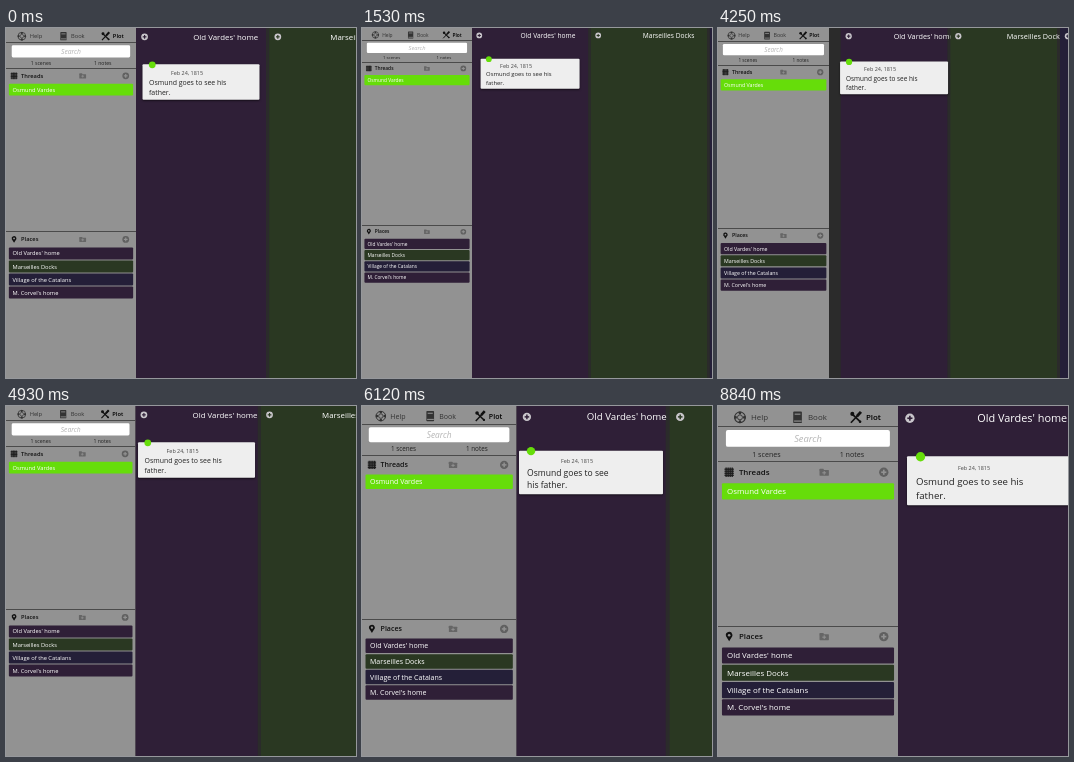
An HTML page with a canvas that plays this animation: 350 by 350 pixels, repeating every 9.01 s.

```html
<!DOCTYPE html>
<html>
<head>
<meta charset="utf-8">
<style>
html, body { margin: 0; width: 100%; height: 100%; overflow: hidden; background: #2b2b2b; }
canvas { display: block; }
</style>
</head>
<body>
<canvas id="stage" width="350" height="350"></canvas>
<script>
const ctx = document.getElementById('stage').getContext('2d');
const LOOP = 9010, STEP = 170, VIEW = 573;
const PURPLE = '#2f1f37', GREEN = '#2a3822', NAVY = '#241f38', LIME = '#66dd0a', GREY = '#929292';
const PLACES = [
  ["Old Vardes' home", PURPLE],
  ['Marseilles Docks', GREEN],
  ['Village of the Catalans', NAVY],
  ["M. Corvel's home", PURPLE]
];
// Zoom changes: [time in ms, change in percent]
const ZOOMS = [
  [500, -10], [1224, -10], [1850, -10],
  [3750, 10], [4220, 10], [4650, 10], [5080, 10],
  [5505, 10], [5990, 10], [6480, 10], [6900, 10]
];
// Zoom at time t, each change spread linearly over the given duration
const zoomAt = (t, duration) => ZOOMS.reduce((sum, [at, change]) =>
  sum + change * Math.max(0, Math.min(1, (t - at) / duration)), 130);

function rect(x, y, w, h, color, radius = 0) {
  ctx.fillStyle = color;
  ctx.beginPath();
  ctx.roundRect(x, y, w, h, radius);
  ctx.fill();
}

function disc(x, y, r, color) {
  ctx.fillStyle = color;
  ctx.beginPath();
  ctx.arc(x, y, r, 0, 7);
  ctx.fill();
}

function line(color, width, ...points) {
  ctx.strokeStyle = color;
  ctx.lineWidth = width;
  ctx.beginPath();
  points.forEach(([x, y]) => ctx.lineTo(x, y));
  ctx.stroke();
}

function text(str, x, y, size, color, align = 'left', style = '') {
  ctx.font = `${style} ${size}px "Open Sans", sans-serif`;
  ctx.textAlign = align;
  ctx.fillStyle = color;
  ctx.fillText(str, x, y + size * 0.36);
}

// Draws in a box from -1 to 1 around x, y
function icon(x, y, r, draw) {
  ctx.save();
  ctx.translate(x, y);
  ctx.scale(r, r);
  draw();
  ctx.restore();
}

function plus(x, y, r, color, cross) {
  icon(x, y, r, () => {
    disc(0, 0, 1, color);
    line(cross, 0.35, [-0.55, 0], [0.55, 0]);
    line(cross, 0.35, [0, -0.55], [0, 0.55]);
  });
}

function lifebuoy() {
  ctx.strokeStyle = '#333';
  for (const [r, width] of [[0.9, 0.18], [0.42, 0.15]]) {
    ctx.lineWidth = width;
    ctx.beginPath();
    ctx.arc(0, 0, r, 0, 7);
    ctx.stroke();
  }
  for (let i = 0; i < 4; i++) {
    ctx.lineWidth = 0.45;
    ctx.beginPath();
    ctx.arc(0, 0, 0.75, i * Math.PI / 2 - 0.3, i * Math.PI / 2 + 0.3);
    ctx.stroke();
  }
}

function book() {
  rect(-0.75, -1, 1.5, 2, '#333', 0.15);
  rect(-0.5, -0.65, 1, 0.2, GREY);
  rect(-0.6, 0.55, 1.3, 0.2, GREY);
}

function tools() {
  line('#111', 0.28, [-0.9, 0.95], [0.8, -0.85]);
  line('#111', 0.5, [0.15, -0.2], [0.85, -0.95]);
  line('#111', 0.3, [-0.8, -0.7], [0.8, 0.85]);
  disc(-0.65, -0.6, 0.35, '#111');
  disc(0.7, 0.75, 0.22, '#111');
}

function mesh() {
  for (const p of [-0.65, -0.22, 0.22, 0.65]) {
    line('#1c1c1c', 0.28, [p, -1], [p, 1]);
    line('#1c1c1c', 0.28, [-1, p], [1, p]);
  }
}

function pin() {
  ctx.fillStyle = '#111';
  ctx.beginPath();
  ctx.arc(0, -0.3, 0.7, Math.PI * 0.9, Math.PI * 2.1);
  ctx.lineTo(0, 1);
  ctx.fill();
  disc(0, -0.3, 0.28, GREY);
}

function folder() {
  rect(-1, -0.75, 0.9, 0.5, '#666', 0.1);
  rect(-1, -0.5, 2, 1.25, '#666', 0.1);
  line(GREY, 0.22, [-0.4, 0.12], [0.4, 0.12]);
  line(GREY, 0.22, [0, -0.28], [0, 0.52]);
}

function column(x, width, zoom, [title, color]) {
  rect(x, 0, width, 350, color);
  plus(x + 0.066 * zoom, 0.068 * zoom, 0.026 * zoom, '#c9c6cb', color);
  text(title, x + 0.94 * zoom, 0.068 * zoom, 0.0605 * zoom, '#fff', 'right');
}

function card(x, zoom) {
  const y = 0.279 * zoom, w = 0.9 * zoom;
  ctx.save();
  ctx.shadowColor = 'rgba(0,0,0,.6)';
  ctx.shadowBlur = 2;
  ctx.shadowOffsetY = 1;
  rect(x, y, w, 0.273 * zoom, '#eee', 1);
  ctx.restore();
  disc(x + 0.075 * zoom, y + 0.5, 0.026 * zoom, LIME);
  text('Feb 24, 1815', x + w / 2 - 14, y + 0.066 * zoom, 5.45, '#444', 'center');
  const narrow = zoom === 100 || (zoom > 130 && zoom < 180);
  const lines = narrow ? ['Osmund goes to see', 'his father.'] : ['Osmund goes to see his', 'father.'];
  lines.forEach((str, i) =>
    text(str, x + 0.05 * zoom, y + (0.141 + 0.0755 * i) * zoom, 0.0535 * zoom, '#222'));
}

function sidebar(w, zoom) {
  const size = 0.044 * zoom, pitch = 1.9 + 0.0855 * zoom;
  const rule = y => rect(0, Math.round(y), w, 1, '#4a4a4a');

  const bar = (str, y, color) => {
    rect(0.022 * zoom, y - (pitch - 1.1) / 2, w - 0.044 * zoom, pitch - 1.1, color, 1);
    text(str, 0.05 * zoom, y, size, '#fff');
  };

  const header = (str, y, draw) => {
    icon(0.062 * zoom, y, 0.026 * zoom, draw);
    text(str, 0.116 * zoom, y, size, '#111', 'left', '600');
    icon(0.59 * w, y, 0.026 * zoom, folder);
    plus(0.921 * w, y, 0.026 * zoom, '#606060', GREY);
  };

  rect(0, 0, w, 350, GREY);
  const navY = 0.063 * zoom;
  icon(0.122 * w, navY, 0.033 * zoom, lifebuoy);
  icon(0.442 * w, navY, 0.032 * zoom, book);
  icon(0.767 * w, navY, 0.032 * zoom, tools);
  text('Help', 0.183 * w, navY, size, '#333');
  text('Book', 0.5 * w, navY, size, '#333');
  text('Plot', 0.822 * w, navY, size, '#000', 'left', '600');
  rule(0.111 * zoom);

  rect(0.044 * w, 0.133 * zoom, 0.911 * w, 0.094 * zoom, '#fff', 0.011 * zoom);
  text('Search', w / 2, 0.18 * zoom, 0.052 * zoom, '#b5b5b5', 'center', 'italic');
  text('1 scenes', 0.269 * w, 0.269 * zoom, 0.0395 * zoom, '#222', 'center');
  text('1 notes', 0.744 * w, 0.269 * zoom, 0.0395 * zoom, '#222', 'center');
  rule(0.307 * zoom);

  header('Threads', 0.368 * zoom, mesh);
  bar('Osmund Vardes', 0.474 * zoom, LIME);

  const top = 161.5 + 0.325 * zoom;
  rule(top - 0.5);
  header('Places', top + 0.059 * zoom, pin);
  PLACES.forEach(([str, color], i) => bar(str, top + 1.4 + 0.156 * zoom + i * pitch, color));
}

function draw(t) {
  const zoom = zoomAt(t, 1);
  const side = zoomAt(t, 300);
  const width = zoomAt(t, 800);
  const pitch = width + 0.025 * zoom;
  const left = side + Math.max(0, (VIEW - side - 4 * pitch) / 2);
  rect(0, 0, 350, 350, '#2b2b2b');
  PLACES.forEach((place, i) => {
    column(left + i * pitch, width, zoom, place);
    if (i === 0) card(left + (width - 0.9 * zoom) / 2, zoom);
  });
  sidebar(side, zoom);
}

function frame() {
  const t = performance.now() % LOOP;
  draw(Math.floor(t / STEP) * STEP);
  requestAnimationFrame(frame);
}
frame();
</script>
</body>
</html>
```
